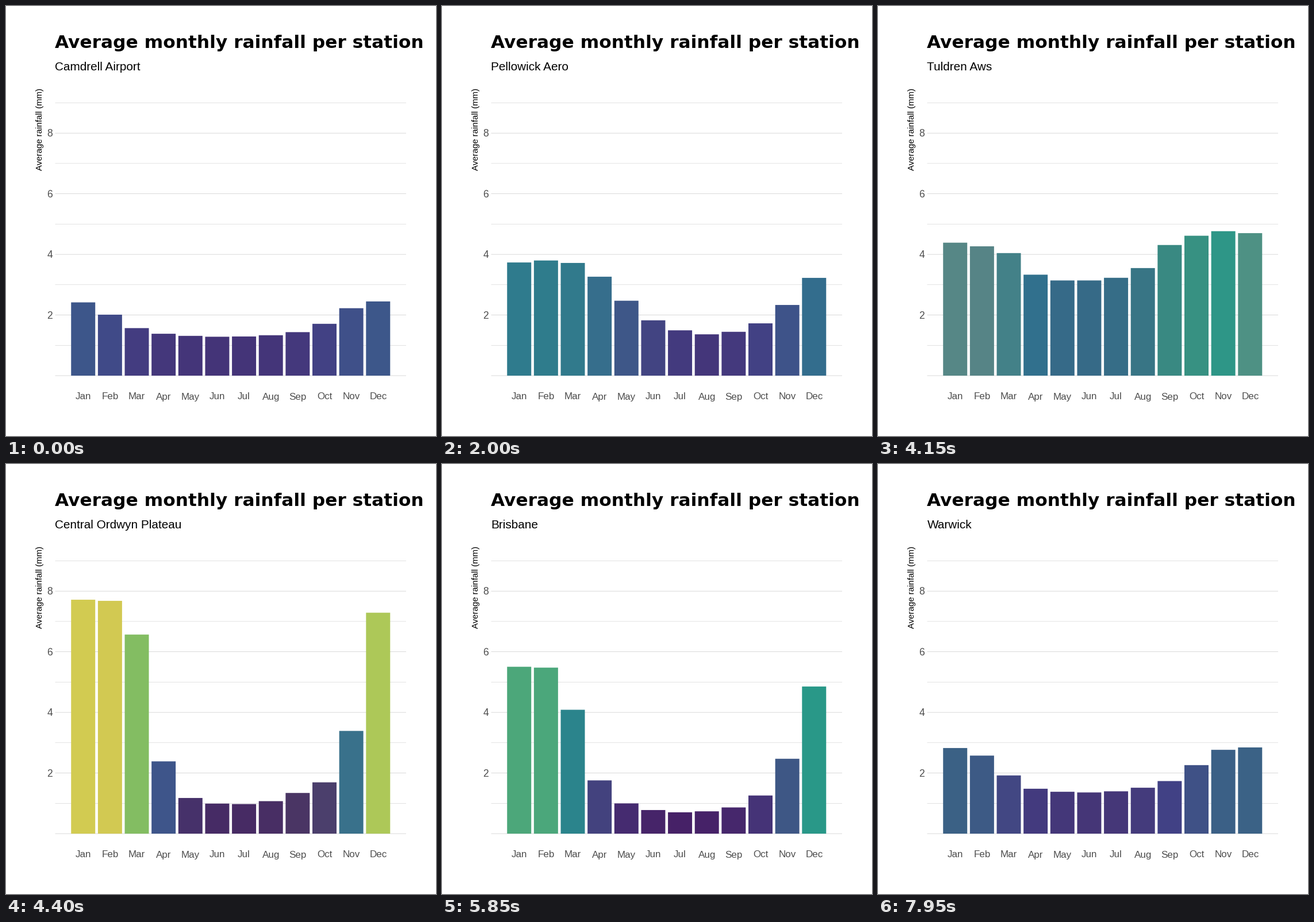
Write a matplotlib script that moves like this. It is 748 by 748 pixels and loops after 8 s.

```python
import numpy as np
import matplotlib
import matplotlib.pyplot as plt
from matplotlib.animation import FuncAnimation
from matplotlib.patches import Rectangle

SIZE, DPI = 748, 88
FRAMES, INTERVAL = 160, 50
HOLD, MOVE = 7, 8            # frames at rest and tween steps per station
LEFT, RIGHT = 85.5, 696
BASE, UNIT = 643, 52.73      # pixel row of zero, pixels per mm
STEP = 46.64
TOP_VALUE = 9.05
SANS = "Liberation Sans"
MONTHS = "Jan Feb Mar Apr May Jun Jul Aug Sep Oct Nov Dec".split()

# name, driest mm, extra mm in the wet season, its middle month, its half width
STATIONS = [
    ("Camdrell Airport", 1.25, 1.2, 11.3, 2.0),
    ("Cavolt Airport Aws", 1.3, 3.7, 0.4, 2.5),
    ("Pellowick Aero", 1.3, 2.8, 1.3, 3.0),
    ("Rellmore Base", 1.0, 2.3, 0.6, 2.6),
    ("Sorvella Harbour", 2.4, 2.1, 3.0, 2.6),
    ("Tuldren Aws", 3.5, 1.7, 9.1, 1.7),
    ("Central Ordwyn Plateau", 0.05, 9.0, 0.4, 2.1),
    ("Wolgrenna Farm", 0.05, 6.8, 0.4, 1.8),
    ("Brisbane", 1.0, 3.7, 0.2, 2.4),
    ("Gornaby Aero", 1.1, 2.9, 0.2, 2.5),
    ("Warwick", 0.9, 2.6, 11.3, 2.7),
    ("Ellerdon Point", 0.75, 1.6, 5.8, 2.6),
]
NAMES = [station[0] for station in STATIONS]


def season(dry, extra, middle, width):
    """Monthly rain as a bell around the wet season, steeper in wetter places."""
    gap = np.abs((np.arange(12) - middle + 6) % 12 - 6)
    return dry + extra / (1 + (gap / width) ** (3 + extra / 3))


RAIN = np.array([season(*station[1:]) for station in STATIONS])

TO_XYZ = np.array([[.4124, .3576, .1805], [.2126, .7152, .0722], [.0193, .1192, .9505]])
WHITE = TO_XYZ.sum(axis=1)
TO_LAB = np.array([[0, 116, 0], [500, -500, 0], [0, 200, -200]])


def rgb_to_lab(rgb):
    linear = np.where(rgb > .04045, ((rgb + .055) / 1.055) ** 2.4, rgb / 12.92)
    xyz = linear @ TO_XYZ.T / WHITE
    f = np.where(xyz > .008856, np.cbrt(xyz), 7.787 * xyz + 16 / 116)
    return f @ TO_LAB.T - [16, 0, 0]


def lab_to_rgb(lab):
    fy = (lab[:, 0] + 16) / 116
    f = np.stack([fy + lab[:, 1] / 500, fy, fy - lab[:, 2] / 200], axis=1)
    xyz = np.where(f > .2069, f ** 3, (f - 16 / 116) / 7.787) * WHITE
    linear = np.clip(xyz @ np.linalg.inv(TO_XYZ).T, 0, 1)
    rgb = np.where(linear > .0031308, 1.055 * linear ** (1 / 2.4) - .055, 12.92 * linear)
    return np.clip(rgb, 0, 1)


# Six viridis stops, blended in Lab
stops = np.linspace(0, 1, 6)
stop_lab = rgb_to_lab(matplotlib.colormaps["viridis"](stops)[:, :3])
LAB = np.stack([np.interp(RAIN / TOP_VALUE, stops, channel) for channel in stop_lab.T], axis=-1)


def px(n):
    return n * 72 / DPI


fig = plt.figure(figsize=(SIZE / DPI, SIZE / DPI), dpi=DPI, facecolor="white")
ax = fig.add_axes([0, 0, 1, 1])
ax.set(xlim=(0, SIZE), ylim=(SIZE, 0))
ax.axis("off")


def label(x, y, text, size, color="black", font=SANS, **kw):
    return ax.text(x, y, text, fontsize=px(size), color=color, family=font,
                   va="baseline", **kw)


for mm in range(10):
    y = BASE - mm * UNIT
    major = mm % 2 == 0
    ax.plot([LEFT, RIGHT], [y, y], color="#cccccc", lw=px(.74 if major else .56),
            solid_capstyle="butt", snap=False, zorder=1)
    if major and mm:
        label(81, y + 6.3, str(mm), 17.5, "#4d4d4d", ha="right")

label(85.5, 73.4, "Average monthly rainfall per station", 31.25, font="DejaVu Sans", weight="bold")
subtitle = label(85.5, 112, NAMES[0], 20.8)
label(63, 143, "Average rainfall (mm)", 15, rotation=90, ha="right", rotation_mode="anchor")

bars = []
for i, month in enumerate(MONTHS):
    x = LEFT + STEP * (i + 1.045)
    label(x, 684.5, month, 17, "#4d4d4d", ha="center")
    bar = Rectangle((x - .45 * STEP, BASE), .9 * STEP, 0, lw=0, zorder=2, snap=False)
    bars.append(ax.add_patch(bar))


def update(frame):
    state, tick = divmod(frame, HOLD + MOVE)
    t = max(0, tick - HOLD) / MOVE
    nxt = min(state + 1, len(NAMES) - 1)
    rain = (1 - t) * RAIN[state] + t * RAIN[nxt]
    colors = lab_to_rgb((1 - t) * LAB[state] + t * LAB[nxt])
    for bar, mm, color in zip(bars, rain, colors):
        bar.set_y(BASE - mm * UNIT)
        bar.set_height(mm * UNIT)
        bar.set_facecolor(color)
    subtitle.set_text(NAMES[nxt if t > .5 else state])
    return [*bars, subtitle]


anim = FuncAnimation(fig, update, frames=FRAMES, interval=INTERVAL,
                     init_func=lambda: update(0), repeat=True, repeat_delay=0, blit=False)
plt.show()
```
